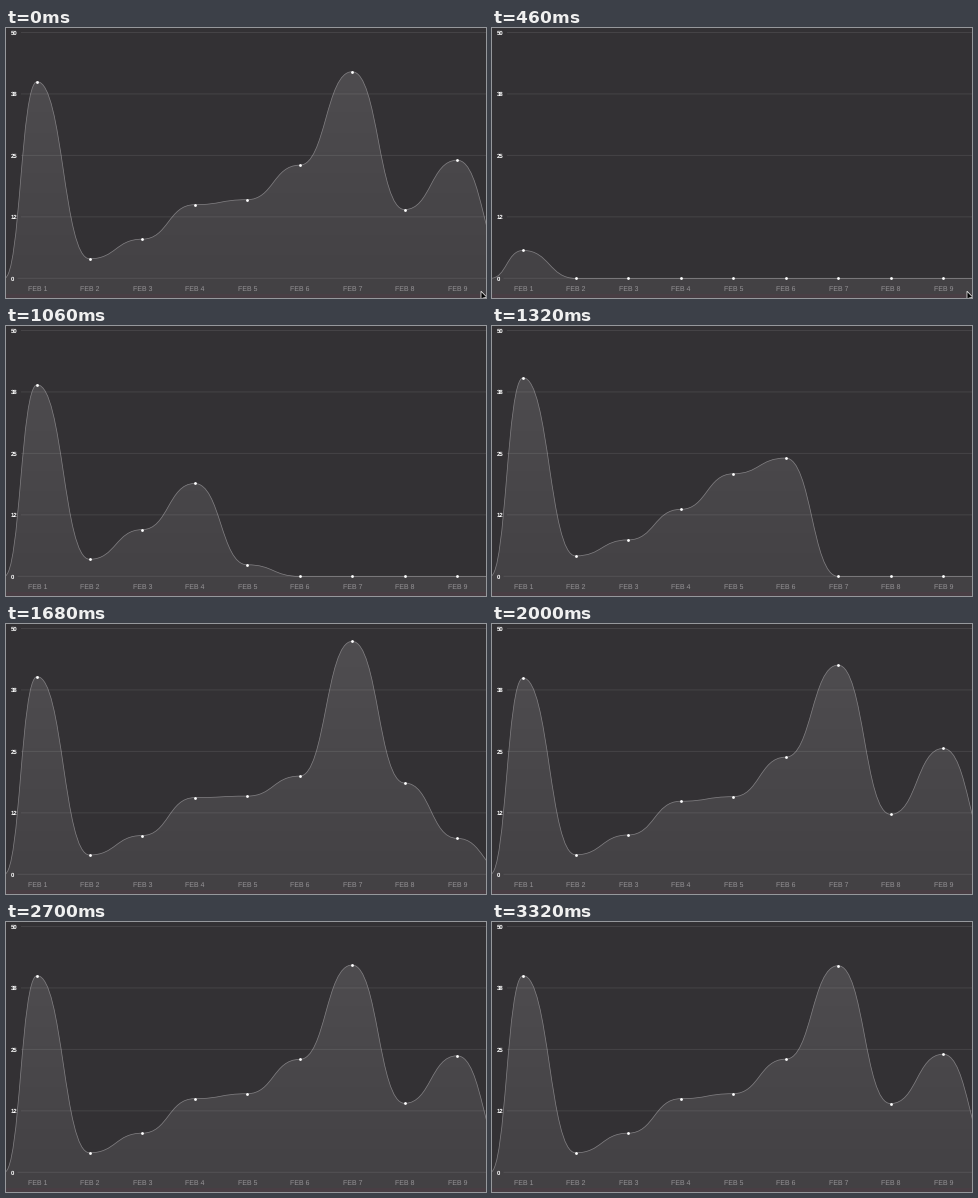
Animation of 480 by 270 pixels, one loop 3980 ms. Source, as a matplotlib script:

```python
import matplotlib.pyplot as plt
import numpy as np
from matplotlib.animation import FuncAnimation
from matplotlib.colors import LinearSegmentedColormap
from matplotlib.patches import PathPatch, Polygon, Rectangle
from matplotlib.path import Path

plt.rcParams["text.hinting"] = "none"
plt.rcParams["text.hinting_factor"] = 1

W, H, DPI = 480, 270, 100
PX = 72 / DPI                       # one pixel in points
STEP, LOOP = 20, 3980               # ms
RESET, FIRST, STAGGER, SPAN = 420, 434, 149.8, 1740
CURSOR_OFF = 860

BG = "#333134"
BASE, GRID_TOP, GRID_GAP = 250.4, 4.5, 61.45
X0, DX, START_X = 31.1, 52.5, -1.8
HEIGHTS = np.array([196.7, 19.6, 39.2, 73.7, 78.7, 113.2, 206.7, 68.8, 118.2, 12.5])
XS = X0 + DX * np.arange(len(HEIGHTS))


def ease_out_elastic(t, period=0.3):
    wave = 2.0 ** (-10 * t) * np.sin((t - period / 4) * 2 * np.pi / period)
    return np.where(t <= 0, 0, np.where(t >= 1, 1, 1 + wave))


def levels(ms):
    """Pixel y of every data point at a given time."""
    if ms < RESET:
        return BASE - HEIGHTS
    starts = FIRST + STAGGER * np.arange(len(HEIGHTS))
    t = np.clip((ms - starts) / SPAN, 0, 1)
    return BASE - HEIGHTS * ease_out_elastic(t)


def curve(ys):
    """Smooth line with horizontal handles halfway between points."""
    verts, codes = [(START_X, BASE)], [Path.MOVETO]
    for x, y in zip(XS, ys):
        px, py = verts[-1]
        mid = (px + x) / 2
        verts += [(mid, py), (mid, y), (x, y)]
        codes += [Path.CURVE4] * 3
    return verts, codes


fig = plt.figure(figsize=(W / DPI, H / DPI), dpi=DPI, facecolor=BG)
ax = fig.add_axes([0, 0, 1, 1])
ax.axis("off")

shade = LinearSegmentedColormap.from_list("shade", ["#504e51", "#434144"])
fill = ax.imshow(np.linspace(0, 1, 256)[:, None], cmap=shade, aspect="auto",
                 extent=(0, W, H, 0), interpolation="bilinear", zorder=1)
ax.set_xlim(0, W)
ax.set_ylim(H, 0)

ax.add_patch(Rectangle((0, 266), W, 4, color="#493e44", lw=0, zorder=1.5))

line = PathPatch(Path([(0, 0), (1, 1)]), fc="none", ec="#817f82",
                 lw=0.75 * PX, zorder=2)
ax.add_patch(line)
dots, = ax.plot([], [], "o", color="white", ms=2.8 * PX, mew=0,
                snap=False, zorder=3)

for i, label in enumerate(["50", "38", "25", "12", "0"]):
    y = GRID_TOP + GRID_GAP * i
    ax.plot([11.5 if label == "0" else 15, W], [y, y], color="white",
            alpha=0.09, lw=PX, solid_capstyle="butt", snap=False, zorder=4)
    ax.text(4.6, y + 2.3, label, color="white", size=6.2 * PX, weight="bold",
            family="Liberation Sans", va="baseline", zorder=5)

for i, x in enumerate(XS[:-1]):
    ax.text(x + 0.2, 263.4, f"FEB {i + 1}", color="#959396", size=6.6 * PX,
            family="Liberation Sans", ha="center", va="baseline", zorder=5)

cursor = Polygon([(475, 263.2), (475, 271.5), (477, 270), (481, 269.4)],
                 fc="black", ec="white", lw=0.7 * PX, zorder=6)
ax.add_patch(cursor)


def update(frame):
    ms = frame * STEP
    ys = levels(ms)
    verts, codes = curve(ys)
    line.set_path(Path(verts, codes))
    # the fill runs on behind the date labels
    area = Path(verts + [(XS[-1], H), (START_X, H)],
                codes + [Path.LINETO, Path.LINETO])
    fill.set_clip_path(area, ax.transData)
    dots.set_data(XS, ys)
    cursor.set_visible(ms < CURSOR_OFF)
    return fill, line, dots, cursor


anim = FuncAnimation(fig, update, frames=LOOP // STEP, interval=STEP,
                     repeat=True, repeat_delay=0)
plt.show()
```
